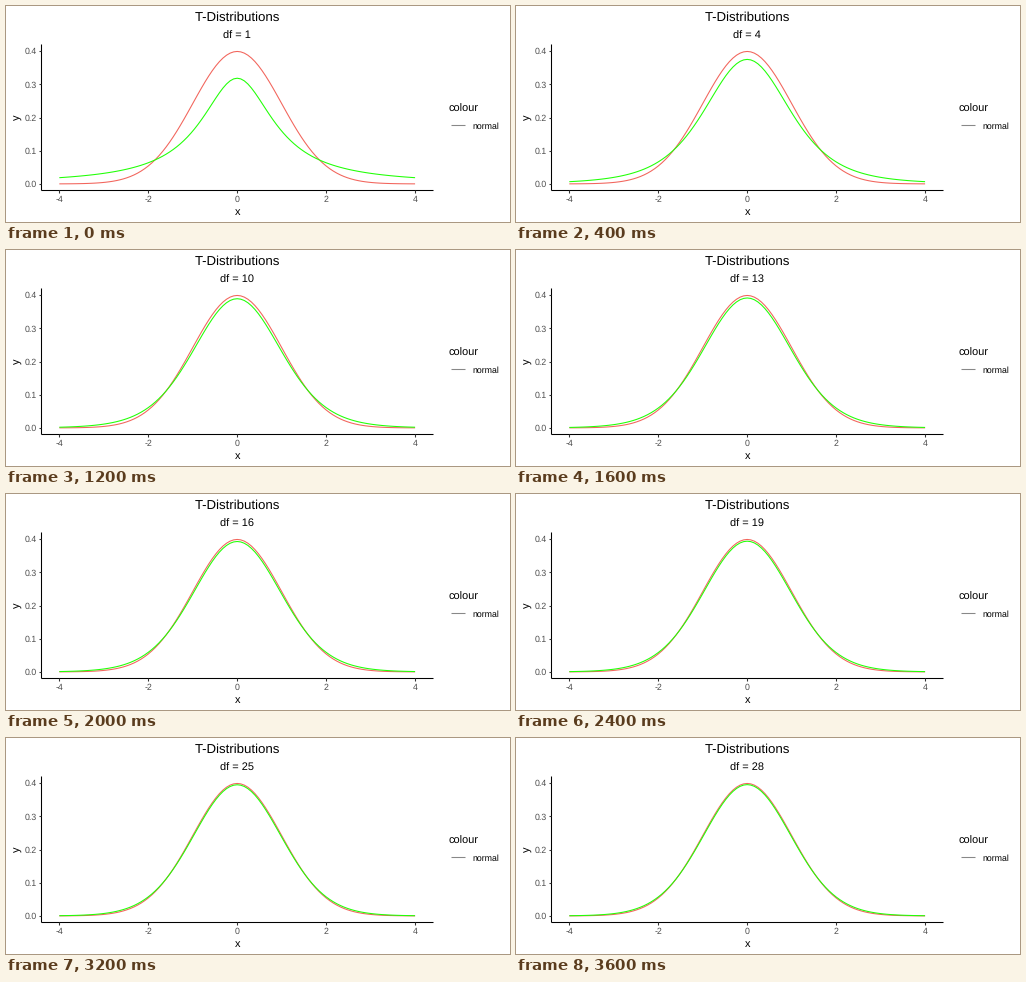
Animation of 504x216 px, one loop 4 s. Source, as a matplotlib script:

```python
import math

import matplotlib.pyplot as plt
import numpy as np
from matplotlib.animation import FuncAnimation

W, H, DPI = 504, 216, 72
LEFT, RIGHT, TOP, BOTTOM = 35.4, 427, 38, 184.4
LINE = 1.07
INK, TICK, LABEL = "black", "#333333", "#4d4d4d"

plt.rcParams.update({
    "font.family": "Liberation Sans",
    "text.hinting": "none",
    "text.kerning_factor": 6,
})


def px(x):
    return 231.2 + 44.47 * np.asarray(x)


def py(y):
    return 177.9 - 332 * np.asarray(y)


def normal_pdf(x):
    return np.exp(-x ** 2 / 2) / math.sqrt(2 * math.pi)


def t_pdf(x, df):
    scale = math.exp(math.lgamma((df + 1) / 2) - math.lgamma(df / 2))
    return scale / math.sqrt(df * math.pi) * (1 + x ** 2 / df) ** (-(df + 1) / 2)


fig = plt.figure(figsize=(W / DPI, H / DPI), dpi=DPI, facecolor="white")
ax = fig.add_axes([0, 0, 1, 1])
ax.set(xlim=(0, W), ylim=(H, 0))
ax.axis("off")


def stroke(xs, ys, color, width=LINE):
    return ax.plot(xs, ys, color=color, lw=width, solid_capstyle="butt")[0]


def label(x, y, text, size, color=INK, ha="center", **kw):
    return ax.text(x, y, text, size=size, color=color, ha=ha,
                   va=kw.pop("va", "baseline"), **kw)


# Curves
x = np.linspace(-4, 4, 101)
stroke(px(x), py(normal_pdf(x)), "#F2655C")
t_curve = stroke(px(x), py(t_pdf(x, 1)), "#21FF06")

# Axes
stroke([LEFT, LEFT], [TOP, BOTTOM], INK)
stroke([LEFT, RIGHT], [BOTTOM, BOTTOM], INK)
for v in (-4, -2, 0, 2, 4):
    stroke([px(v)] * 2, [BOTTOM, BOTTOM + 2.75], TICK)
    label(px(v), 196, str(v), 8.8, LABEL)
for v in (0, 0.1, 0.2, 0.3, 0.4):
    stroke([LEFT - 2.75, LEFT], [py(v)] * 2, TICK)
    label(30.6, py(v) + 3.2, f"{v:.1f}", 8.8, LABEL, ha="right")

# Titles
label(231.3, 15, "T-Distributions", 13.2)
subtitle = label(231.3, 33, "df = 1", 11)
label(231.3, 209, "x", 11)
label(11.5, 111, "y", 11, rotation=90, va="center")

# Legend
label(443, 106, "colour", 11, ha="left")
stroke([444.9, 459], [119, 119], "#888888")
label(466, 123, "normal", 8.8, ha="left")


def update(i):
    df = 1 + 3 * i
    t_curve.set_ydata(py(t_pdf(x, df)))
    subtitle.set_text(f"df = {df}")
    return t_curve, subtitle


anim = FuncAnimation(fig, update, frames=10, interval=400, repeat=True,
                     repeat_delay=0, blit=False)
plt.show()
```
